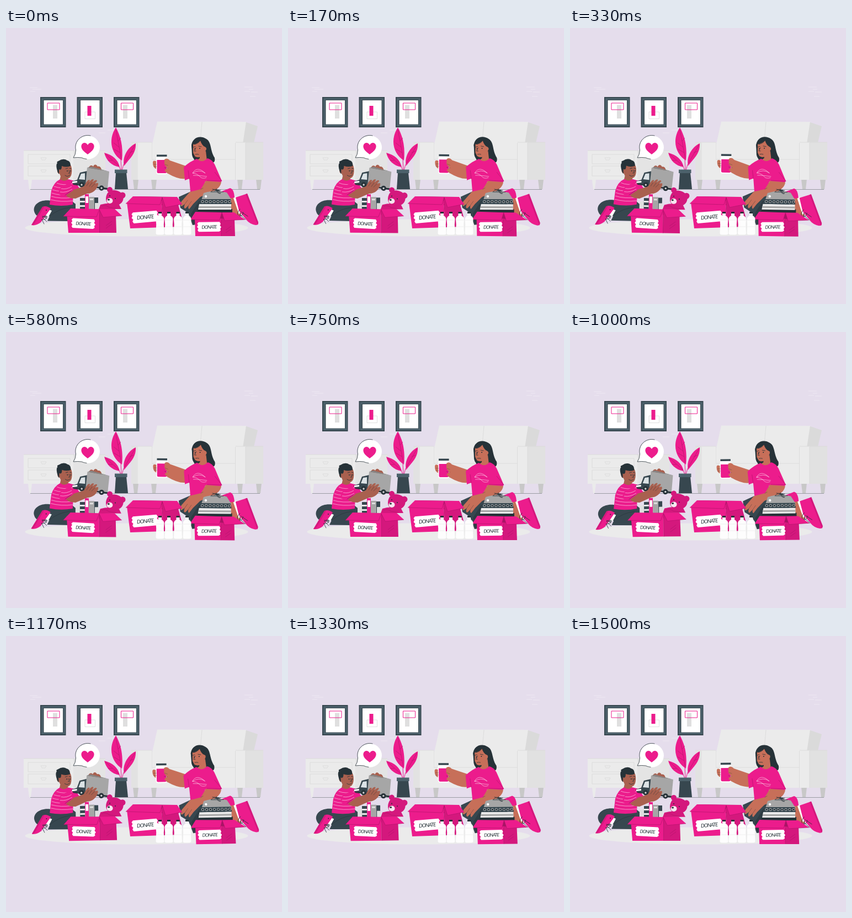
An HTML page that plays this animation: 500 by 500 pixels, repeating every 1.54 s.

```html
<!DOCTYPE html>
<html lang="en">
<head>
<meta charset="utf-8">
<title>Donation boxes</title>
<style>
  html, body { margin: 0; height: 100%; overflow: hidden; background: #e5ddec; }
  svg { display: block; width: 100vw; height: 100vh; }
  .pink { fill: #ec1c8c; }
  .rose { fill: #d4187d; }
  .wine { fill: #a81465; }
  .dark { fill: #37474f; }
  .ink { fill: #263238; }
  .white { fill: #fff; }
  .pale { fill: #ebebeb; }
  .mist { fill: #dfdfdf; }
  .grey { fill: #a6a6a6; }
  .boy { fill: #a9604f; }
  .mom { fill: #c76f59; }
  .line { fill: none; stroke: #263238; stroke-width: .8; stroke-linecap: round; stroke-linejoin: round; }
  .soft { fill: none; stroke: #d9d9d9; stroke-width: .8; }
  .light { fill: none; stroke: #fff; stroke-width: .7; opacity: .75; }
  .edge { fill: none; stroke: #b3156c; stroke-width: .7; }
  .rim { fill: none; stroke: #ec1c8c; }
  text { font: italic 8.5px Lato, sans-serif; letter-spacing: -.9px; text-anchor: middle; fill: #263238; }
</style>
</head>
<body>
<svg viewBox="0 0 500 500">
  <defs>
    <g id="frame">
      <path class="dark" d="M0 0H46.500V55H0Z"/>
      <path fill="#4c616b" d="M2 2H45V53H2Z"/>
      <path class="dark" d="M5 5H42V50H5Z"/>
      <path class="white" d="M6.500 6H41V49.500H6.500Z"/>
    </g>
    <g id="bottle">
      <path class="ink" d="M-3 333H3V337H-3Z"/>
      <path fill="#fdfdfd" d="M-3 336H3V340Q7.500 342 7.500 347L6.800 356 7.500 372Q7 374.500 4 374.500H-4Q-7 374.500 -7.500 372L-6.800 356 -7.500 347Q-7.500 342 -3 340Z"/>
      <path class="soft" stroke-opacity=".55" d="M-7 348H7M-6.500 360H6.500M-3 339H3"/>
    </g>
    <path id="label" class="white" d="M-19-8.500H19L21-5 19.500-2 22 1 20 4 21 7 18 9H-19L-21 6-19.500 3-22 0-20-3-21.500-6Z"/>
  </defs>

  <!-- room -->
  <g fill="none" stroke="#efeaf3" stroke-width=".8">
    <path d="M43 108h14m-9 3h16m-20 4h9M432 107h15m-7 4h8m-16 4h10m2 1h12m-14 8h10M168 190h12m4-5h14"/>
  </g>
  <g transform="translate(62 125)"><use href="#frame"/>
    <path class="mist" d="M23 14.500H31V39H23Z"/><path class="rim" d="M13 11H35V23H13Z"/></g>
  <g transform="translate(128.500 125)"><use href="#frame"/>
    <path class="soft" d="M14.500 27H33V39.500H14.500Z"/><path class="pink" d="M19 16H26V34H19Z"/></g>
  <g transform="translate(195 125)"><use href="#frame"/>
    <path class="mist" d="M17 14.500H25V39H17Z"/><path class="rim" d="M13.500 11H35.500V23H13.500Z"/></g>

  <path class="pale" d="M32 222H180V275H32Z"/>
  <path fill="#e4e4e4" d="M122 222H180V275H122Z"/>
  <path class="soft" d="M40 229H116V246H40ZM40 250H116V268H40ZM63 235h10l-2 4h-6ZM63 257h10l-2 4h-6ZM32 222H180"/>
  <path class="pale" d="M40 275H47L45 292H42Z"/>

  <path fill="#dadada" d="M433 170 456 178 448 212H420Z"/>
  <path class="pale" d="M274 169.500 435 170 424 242H258Z"/>
  <path class="soft" d="M355 170 349 239"/>
  <path fill="#c8c8c8" d="M230 274H240L238 292H232ZM263 274H273L271 292H265ZM419 274H429L427 292H421ZM453 274H463L461 292H455Z"/>
  <path fill="#e2e2e2" d="M227 207H265V275H227Z"/>
  <path class="pale" d="M237 207H264V238H420V275H237Z"/>
  <path fill="#e1e1e1" d="M432 207H466V275H432Z"/>
  <path class="pale" d="M415.500 207H434V275H415.500Z"/>
  <path class="soft" d="M238 208V275M264 238H415M415.500 208V275M434 208V275M227 207H264M416 207H466"/>
  <path d="M44 292.500H460" stroke="#878c92" stroke-width=".8"/>
  <ellipse class="pale" cx="236.500" cy="362" rx="202" ry="15.500"/>

  <!-- plant -->
  <path class="pink" d="M210 240C193 230 183 205 199 180C207 194 213 214 210 240ZM214 250C210 232 222 215 235 209C236 228 224 236 214 250ZM206 252C191 250 181 239 178 226C193 230 203 238 206 252Z"/>
  <path class="rim" d="M208 238 209 258M213 247 210 258M204 249 208 258"/>
  <path class="edge" d="M199 184 209 237M234 211 214 246M180 228 205 250M203 205l5-6M205 216l-10-8M207 226l-12-7M224 226l7-3M193 240l-8 0"/>
  <path class="dark" d="M199 262H218L221 292H197Z"/>
  <path fill="#4c616b" d="M197 256.500H219.500V263H197Z"/>

  <!-- speech bubble -->
  <path class="white" d="M126.500 221A22 21.500 0 1 1 137 235Q130 234 122 235Q126 230 126.500 221Z"/>
  <path class="line" d="M153 195A22 21.500 0 0 0 126.500 221Q126 230 122 235Q130 234 137 235Q141 237 146 237.500"/>
  <path class="pink" d="M148 229C141 224 135.500 219 136.500 213C138 207 145 206 148 212C151 206 158 207 159.500 213C160.500 219 155 224 148 229Z"/>

  <!-- boy, toys and box -->
  <g id="left">
    <path class="boy" d="M149 257C150 249 155 247 158 251C160 246 164 247 166 251C170 249 174 255 173 260L150 264Z"/>
    <path class="dark" d="M86 314C66 308 48 318 51 332C54 344 66 345 79 341L75 349.500 118 350 135 326 120 314Z"/>
    <path class="line" d="M79 341Q95 327 117 325" stroke-opacity=".7"/>
    <path class="white" d="M76 328 83 331 77 342 70 341Z"/>
    <path class="pink" d="M46 357 66 324Q73 321 81 327L71 341 63 352Q54 359 46 357Z"/>
    <path class="rose" d="M46 357 66 324 69 324 50 357Z"/>
    <path class="line" d="M66 343l8 8m-8-9q10-4 8 1t-9 4m1-6 8 4M65 347l4 8"/>
    <circle class="ink" cx="73" cy="330" r="1"/>

    <path class="boy" d="M99 268 113 268 112 279Q105 283 97 277Z"/>
    <path class="pink" d="M98 274Q105 280 113 274L124 277 133 290 122 296 121 320Q100 324 79 320L82 295Q86 280 98 274Z"/>
    <path class="light" d="M92 281Q104 286 120 282M87 287Q101 292 116 288M84 293Q99 298 113 294M83 299Q97 304 112 301M82 305Q99 310 121 307M81 311Q100 316 121 313"/>
    <path class="boy" d="M95 248Q99 241 111 243C119 246 120 255 119 263Q118 273 109 273Q99 272 97 264Q92 263 93 257Z"/>
    <path class="ink" d="M96 265C91 257 90 246 93 245Q91 242 95 241Q104 235 111 240Q117 241 117 250Q109 253 101 250Q101 259 96 256Z"/>
    <path class="line" d="M108 255l4-1M115 254l3 1M114 258l2 5-3 0M107 267Q112 271 116 266"/>
    <circle class="ink" cx="111" cy="259" r="1"/><circle class="ink" cx="117" cy="259" r="1"/>

    <path class="dark" d="M119 278 129 275 134 262 147 259V286L121 282Z"/>
    <path fill="#dce3e6" d="M132 274 136 264 143 263V275Z"/>
    <path class="white" d="M120 278 129 277V280L120 281Z"/>
    <path class="grey" d="M147 253 187 260 184 291 144 284Z"/>
    <path fill="#858585" d="M147 253 154 251 187 260Z"/>
    <path class="ink" d="M121 282 185 290V293L122 284Z"/>
    <g fill="#d5d5d5" stroke="#263238" stroke-width="3"><circle cx="137" cy="284" r="3.200"/><circle cx="173" cy="290" r="3.200"/></g>
    <path class="boy" d="M113 288 122 293 141 287C147 276 150 273 152 276L150 280Q157 271 159 275L156 280Q164 273 165 277L161 282Q168 279 167 283C165 293 157 300 147 300L126 309Q111 309 107 301Z"/>
    <path class="pink" d="M100 287 117 280 122 294 108 304Q97 304 94 299Z"/>
    <path class="light" d="M100 291Q110 293 119 287M98 297Q109 299 120 292"/>
    <path class="line" stroke-opacity=".55" d="M150 280l-4 6M156 280l-5 7M161 282l-6 6M107 303 118 295"/>

    <path class="wine" d="M116 328 132 327 197 328 195 338H116Z"/>
    <path class="mist" d="M126 315 134 313 137 330H126Z"/><path class="dark" d="M134 308H143V331H134Z"/>
    <path class="pale" d="M134 313H143V316H134ZM134 321H143V324H134Z"/>
    <path class="pink" d="M143 301H150V330H143Z"/><path class="white" d="M144 305H149V317H144Z"/>
    <path class="grey" d="M150 306H160V330H150Z"/><path class="dark" d="M160 307H167V330H160Z"/>
    <path class="mist" d="M152 309H158V312H152ZM161 317H168V329H161Z"/>
    <path class="rose" d="M171 320Q187 315 205 320L209 328H168Z"/>
    <circle class="rose" cx="188" cy="293" r="5"/><circle class="rose" cx="211" cy="303" r="5.500"/>
    <path class="rose" d="M184 299C190 290 207 293 212 303C215 314 207 323 195 321C181 322 178 309 184 299Z"/>
    <ellipse cx="188" cy="313" rx="5.500" ry="5" fill="#f6e6ef"/>
    <ellipse class="ink" cx="186" cy="311" rx="2" ry="1.500"/><circle class="ink" cx="188" cy="304" r="1"/><circle class="ink" cx="198" cy="309" r="1"/>
    <path class="edge" d="M173 323Q180 319 187 325L200 327"/>

    <path class="pink" d="M110 334 169 329V371H113Z"/>
    <path class="rose" d="M169 329 199 337 200 371H169Z"/>
    <path class="pink" d="M104 341 117 327 169 328 164 342Z"/>
    <path class="pink" d="M169 328 197 328 210 340 176 343Z"/>
    <path class="edge" d="M104 341 164 342 169 329 176 343 210 340M169.500 330V371M181 358l11-8m-11 13 11-8"/>
    <g transform="translate(140 354) rotate(3)"><use href="#label"/><text y="3.500">DONATE</text></g>
  </g>

  <!-- woman, typewriter and box -->
  <g id="right">
    <path class="dark" d="M313 306 344 292 385 293 400 306 391 350 338 357 330 335 316 326Z"/>
    <path class="ink" d="M335 337 350 313 358 314 348 345 339 357Z" opacity=".5"/>
    <path class="mom" d="M401 303 416 307 427 334 421 346 409 333Z"/>
    <path class="pink" d="M388 297 406 290Q413 292 414 307L402 309Z"/>
    <path class="white" d="M412 308 417 305 430 333 422 337Z"/>
    <path class="pink" d="M416 307 437 300 457 352Q458 357 452 357Q441 355 435 347L422 331Z"/>
    <path class="rose" d="M434 301 437 300 457 352 456 357Z"/>
    <path class="line" d="M424 328q-8 9-2 12t8-6m-4-1 12 8m-14-3 10 9m-10-13q2 7-3 11"/>

    <path class="ink" d="M336 213C337 199 351 193 363 201C373 207 369 221 378 235Q380 246 370 244L341 239Q338 232 338 225Z"/>
    <path class="mom" d="M351 226 362 223 364 240Q356 247 345 240L351 236Z"/>
    <path class="mom" d="M338 211Q347 210 352 204Q355 213 360 215Q366 217 360 225C357 231 352 235 346 234Q337 232 337 222Z"/>
    <path class="line" d="M339 216l4-1M349 214l5 1M344 217l-3 6 3 0M343 229Q346 228 349 229M341 211Q349 209 352 204"/>
    <circle class="ink" cx="342" cy="219" r="1"/><circle class="ink" cx="351" cy="218" r="1"/>
    <path class="ink" d="M336 211 339 210 339 226 345 238Q339 239 337 230Z"/>

    <path class="mom" d="M266 244Q266 239 271 241L284 244 284 252 271 255Q266 252 266 244Z"/>
    <path fill="#fff" d="M273 233H292V261Q292 265 288 265H276Q272 265 272 261V237Z"/>
    <path class="pink" d="M273.500 239H291V261Q291 263 288 263H276Q273.500 263 273.500 261Z"/>
    <path class="dark" d="M273 229.500H291.500V233H273Z"/>
    <path class="mom" d="M287 238Q292 234 297 240L326 250 330 272Q316 277 292 263L287 258 292 254 287 247Z"/>
    <path class="line" stroke-opacity=".4" d="M288 247l5 2M287 253l6 1M268 247h5M268 251h5"/>

    <path class="pink" d="M322 252Q334 241 346 237Q355 246 365 236Q373 238 378 247L391 277 385 283 361 278 354 299Q344 302 334 296L332 273 324 276Z"/>
    <path class="light" d="M338 263q8-14 23 0q-11-8-23 0Zm0 0q9 1 13 6t12 2M339 267q10 0 25 2"/>
    <path class="edge" d="M330 258 332 274M378 261 391 277 364 276"/>
    <path class="mom" d="M362 277 390 279Q388 292 370 298L352 306 339 319 332 328Q329 327 331 321L325 327Q321 327 324 319L318 323Q314 321 318 314L333 297 353 292Z"/>
    <path class="line" stroke-opacity=".45" d="M331 321l5-7M324 319l5-7M353 292l4-2"/>

    <path class="ink" d="M347 328 410 328 410 336H347Z"/>
    <path class="pale" d="M350 319H408V329H348Z"/>
    <path class="grey" d="M349 323H408V326H349Z"/>
    <path class="grey" d="M358 299Q380 292 400 298L409 312H354Z"/>
    <path class="dark" d="M353 310H407L409 319H350Z"/>
    <path d="M356 314.500H407" fill="none" stroke="#c8c8c8" stroke-width="5" stroke-linecap="round" stroke-dasharray="0 7"/>
    <path d="M356 314.500H407" fill="none" stroke="#263238" stroke-width="3.500" stroke-linecap="round" stroke-dasharray="0 7"/>
    <circle class="white" cx="362" cy="305" r="2.200"/>
    <path class="line" d="M371 297q8-8 12-2t6 4m-15-7 15 2m-17 3 22 0m-13-6q0 9 7 9"/>

    <path class="wine" d="M344 334H410V348H344Z"/>
    <path class="pink" d="M342 345H390V377H343Z"/>
    <path class="rose" d="M389 345 414 347 415 377H390Z"/>
    <path class="pink" d="M343 333 391 334 387 348 334 347ZM391 334 413 334 433 347 396 349Z"/>
    <path class="edge" d="M334 347 387 348 391 334 396 349 433 347M390 348V377M398 366l10-7m-10 12 10-7"/>
    <g transform="translate(368 360) rotate(-1)"><use href="#label"/><text y="3.500">DONATE</text></g>
  </g>

  <!-- middle box and bottles -->
  <path class="wine" d="M231 305 309 306 313 321H222Z"/>
  <path class="pink" d="M219 316 282 313 285 361 225 363Z"/>
  <path class="rose" d="M282 310 312 320 318 342 314 360 285 361Z"/>
  <path class="pink" d="M230 305 283 306 279 320 217 318Z"/>
  <path class="pink" d="M283 306 310 306 319 319 289 325Z"/>
  <path class="edge" d="M217 318 279 320 283 307 289 325 319 319M283 319V360"/>
  <g transform="translate(252 342) rotate(-5) scale(1.120)"><use href="#label"/><text y="3.500">DONATE</text></g>
  <use href="#bottle" x="279"/><use href="#bottle" x="295"/><use href="#bottle" x="311.500"/><use href="#bottle" x="328"/>
</svg>
<script>
  const PERIOD = 1540;
  const left = document.getElementById('left');
  const right = document.getElementById('right');

  // Linear sway: 0 → 1° → -1° → 0.
  function sway(phase) {
    if (phase < .25) return phase * 4;
    return phase < .75 ? 2 - phase * 4 : phase * 4 - 4;
  }

  function draw() {
    const angle = sway(performance.now() % PERIOD / PERIOD);
    left.setAttribute('transform', `rotate(${angle} 131 304)`);
    right.setAttribute('transform', `rotate(${angle} 361 287)`);
    requestAnimationFrame(draw);
  }
  draw();
</script>
</body>
</html>
```
